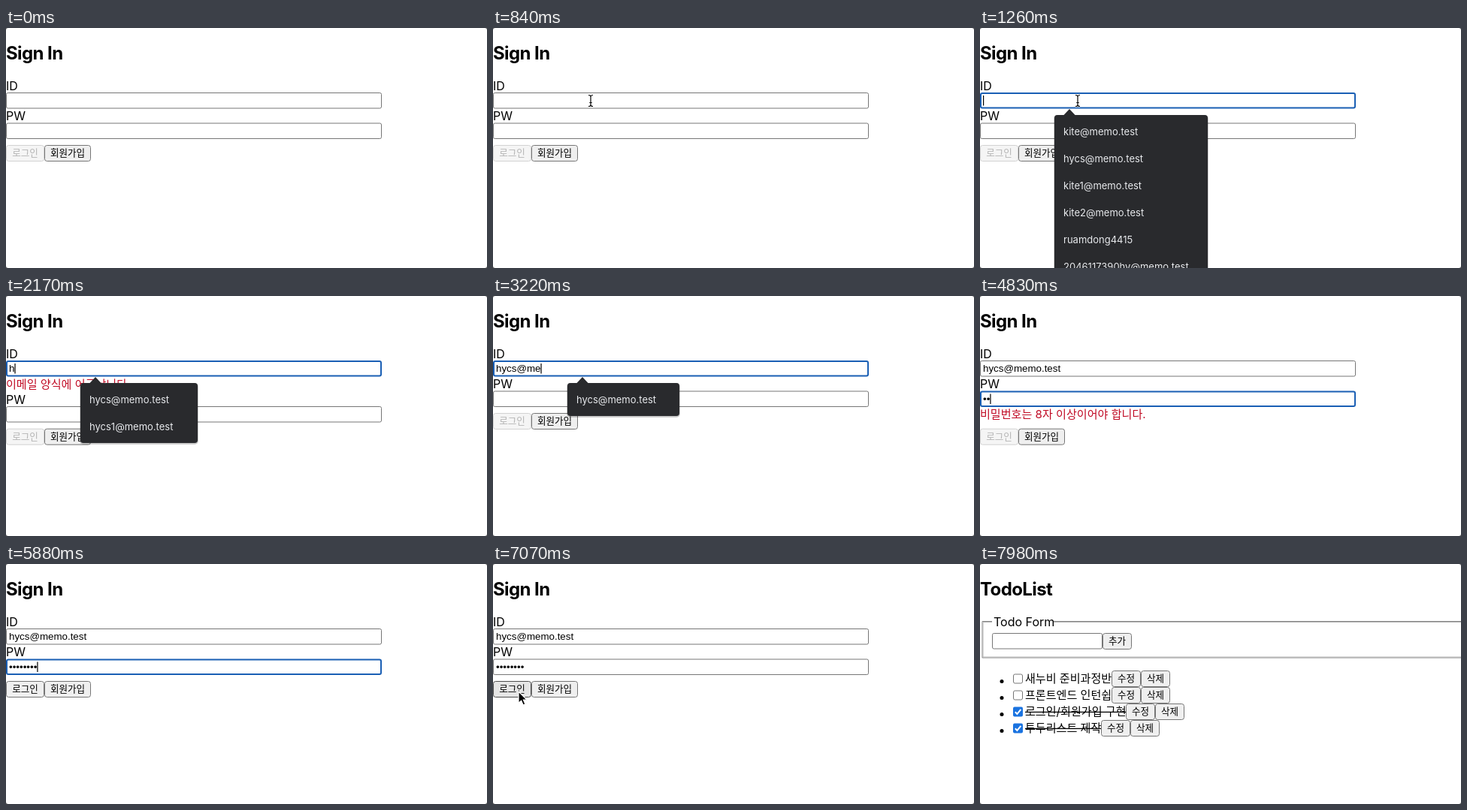
An HTML page that plays this animation: 640x320 px, repeating every 8750 ms.

```html
<!DOCTYPE html>
<html lang="ko">
<head>
<meta charset="utf-8">
<title>Sign In</title>
<style>
  html, body { margin: 0; height: 100%; overflow: hidden; background: #555; }
  svg { display: block; width: 640px; height: 320px; }
  text { font-family: Inter, "Noto Sans CJK KR", "Noto Sans CJK", sans-serif; white-space: pre; }
  .title { font-size: 24px; font-weight: 700; letter-spacing: -.6px; }
  .label { font-size: 16px; }
  .body { font-size: 15.08px; }
  .error { font-size: 15.08px; fill: #c00a24; }
  .button { font-size: 12.56px; }
  .value { font-family: "Liberation Sans", Arial, sans-serif; font-size: 13.33px; }
  .option { font-size: 13px; fill: #e8eaed; }
</style>
</head>
<body>
<svg id="stage" viewBox="0 0 640 320"></svg>
<script>
const LOOP = 8750, STEP = 70;
const EMAIL = 'hycs@memo.test';
const EMAIL_KEYS = [2100, 2310, 2450, 2660, 3010, 3150, 3220, 3360, 3430, 3570, 3710, 3710, 3780, 3920];
const PASSWORD_KEYS = [4620, 4760, 4970, 5180, 5390, 5530, 5670, 5880];
const SAVED = ['kite@memo.test', EMAIL, 'kite1@memo.test', 'kite2@memo.test', 'ruamdong4415', '2046117390hy@memo.test'];
const TODOS = [
  ['새누비 준비과정반', 115, false],
  ['프론트엔드 인턴쉽', 115, false],
  ['로그인/회원가입 구현', 134, true],
  ['투두리스트 제작', 101, true],
];

const stage = document.getElementById('stage');
const measure = document.createElement('canvas').getContext('2d');
measure.font = '13.33px "Liberation Sans", Arial, sans-serif';

const within = (t, from, to) => t >= from && t < to;
const typed = (keys, t) => keys.filter(key => key <= t).length;
const text = (kind, x, y, string, extra = '') =>
  `<text class="${kind}" x="${x}" y="${y}" ${extra}>${string}</text>`;
const box = (x, y, w, h, fill, stroke = 'none', rx = 0, extra = '') =>
  `<rect x="${x}" y="${y}" width="${w}" height="${h}" rx="${rx}" fill="${fill}" stroke="${stroke}" ${extra}/>`;

function field(x, y, w, value = '', focused = false, caret = false) {
  const frame = focused
    ? box(x + 1, y + 1, w - 2, 19.5, '#fff', '#1a5fb4', 2, 'stroke-width="2"')
    : box(x + .5, y + .5, w - 1, 20.5, '#fff', '#767676', 2);
  const caretX = x + 4 + measure.measureText(value).width;
  return frame + text('value', x + 4, y + 15, value) +
    (caret ? box(caretX, y + 4, 1.2, 13.5, '#000') : '');
}

function button(x, y, w, label, state = 'normal') {
  const [fill, stroke, ink] = {
    normal: ['#efefef', '#767676', '#000'],
    disabled: ['#f5f5f5', '#d2d2d2', '#b4b4b4'],
    hover: ['#e5e5e5', '#4f4f4f', '#000'],
    pressed: ['#f5f5f5', '#8d8d8d', '#000'],
  }[state];
  return box(x + .5, y + .5, w - 1, 21, fill, stroke, 3) +
    text('button', x + w / 2, y + 14.8, label, `text-anchor="middle" fill="${ink}"`);
}

function popup(options, w) {
  const h = options.length * 36 + 8;
  return box(98, 116, w + 2, h + 2, '#0003', 'none', 5) +
    box(99, 116, w, h, '#292a2d', 'none', 4) +
    '<path d="M111 116.5L119 108L127 116.5Z" fill="#292a2d"/>' +
    options.map((option, i) => text('option', 111, 143 + 36 * i, option)).join('');
}

function suggestions(t) {
  if (within(t, 1190, 2170)) return popup(SAVED, 204);
  if (within(t, 2170, 3010)) return popup([EMAIL, 'hycs1@memo.test'], 156);
  if (within(t, 3010, 4130)) return popup([EMAIL], 149);
  return '';
}

function signIn(t) {
  const email = EMAIL.slice(0, typed(EMAIL_KEYS, t));
  const dots = typed(PASSWORD_KEYS, t);
  const emailError = email && !email.includes('@');
  const passwordError = dots > 0 && dots < 8;
  const y = emailError ? 20.5 : 0;
  const buttonY = 156 + (emailError || passwordError ? 20.7 : 0);
  const emailFocus = within(t, 1120, 4340), passwordFocus = within(t, 4340, 6650);
  const login = dots < 8 ? 'disabled' : t < 6580 ? 'normal' : within(t, 6650, 7070) ? 'pressed' : 'hover';
  return text('title', 0, 42, 'Sign In') +
    text('label', 0, 82.5, 'ID') +
    field(0, 86, 500, email, emailFocus, emailFocus && t >= 1260 && !within(t, 1750, 2100)) +
    (emailError ? text('error', 0, 122.5, '이메일 양식에 어긋납니다') : '') +
    text('label', 0, 123 + y, 'PW') +
    field(0, 126.5 + y, 500, '•'.repeat(dots), passwordFocus, passwordFocus) +
    (passwordError ? text('error', 0, 163, '비밀번호는 8자 이상이어야 합니다.') : '') +
    button(0, buttonY, 51, '로그인', login) +
    button(51, buttonY, 62, '회원가입') +
    suggestions(t);
}

function todoRow([label, w, done], i) {
  const y = 142 + 22 * i;
  const check = done
    ? box(44, y + 4.5, 13, 13, '#1a73e0', 'none', 2) +
      `<path d="M46.8 ${y + 11.2}l2.6 2.7l5-6" fill="none" stroke="#fff" stroke-width="2"/>`
    : box(44.5, y + 5, 12, 12, '#fff', '#767676', 2);
  return `<circle cx="29" cy="${y + 14.5}" r="2.5"/>` + check +
    text('body', 60, y + 15.5, label) +
    (done ? box(60, y + 10.8, w, 1.3, '#000') : '') +
    button(60 + w, y, 39, '수정') + button(99 + w, y, 39, '삭제');
}

function todoList(t) {
  const groove = (inset, color) =>
    `<path d="M16 ${76 + inset}H${2.5 + inset}V${125.5 - inset}H640M98 ${76 + inset}H640" fill="none" stroke="${color}"/>`;
  return text('title', 0, 42, 'TodoList') +
    groove(.5, '#858585') + groove(1.5, '#b4b4b4') +
    text('label', 18, 82.5, 'Todo Form') +
    field(16, 92, 147) + button(163, 92, 39, '추가') +
    (t >= 7350 ? TODOS.map(todoRow).join('') : '');
}

function glide(t, start, end, from, to, ease) {
  const p = ease(Math.min(1, Math.max(0, (t - start) / (end - start))));
  return from.map((v, i) => v + (to[i] - v) * p);
}

function pointer(t) {
  const smooth = p => p * p * (3 - 2 * p);
  let spot;
  if (within(t, 140, 2100)) spot = glide(t, 70, 840, [250, 322], [130, 97], smooth);
  else if (within(t, 6090, 7630)) spot = glide(t, 6020, 6720, [130, 97], [34, 170], smooth);
  else if (within(t, 7630, 7980)) spot = glide(t, 7560, 7980, [34, 170], [290, 325], p => p ** 1.4);
  else return '';
  const [x, y] = spot;
  const overField = t < 7280 && (within(y, 86, 108) || within(y, 126, 148));
  const place = `transform="translate(${x} ${y})"`;
  if (!overField)
    return `<path ${place} d="M0 0V15.5L3.6 12.2L6.2 18L8.9 16.8L6.4 11.2H11.3Z" stroke="#fff" stroke-width="1.2"/>`;
  const beam = (color, width) =>
    `<path ${place} d="M-3 -7.5Q0 -7.5 0 -5.5Q0 -7.5 3 -7.5M0 -5.5V5.5M-3 7.5Q0 7.5 0 5.5Q0 7.5 3 7.5M-1.7 2.5H1.7" fill="none" stroke="${color}" stroke-width="${width}"/>`;
  return beam('#fff', 2.6) + beam('#000', 1.2);
}

let shown = -1;
function draw(now) {
  const t = Math.floor(now % LOOP / STEP) * STEP;
  if (t !== shown) {
    shown = t;
    stage.innerHTML = box(0, 0, 640, 320, '#fff', 'none', 3) +
      (t < 7280 ? signIn(t) : todoList(t)) + pointer(t);
  }
  requestAnimationFrame(draw);
}
draw(0);
</script>
</body>
</html>
```
